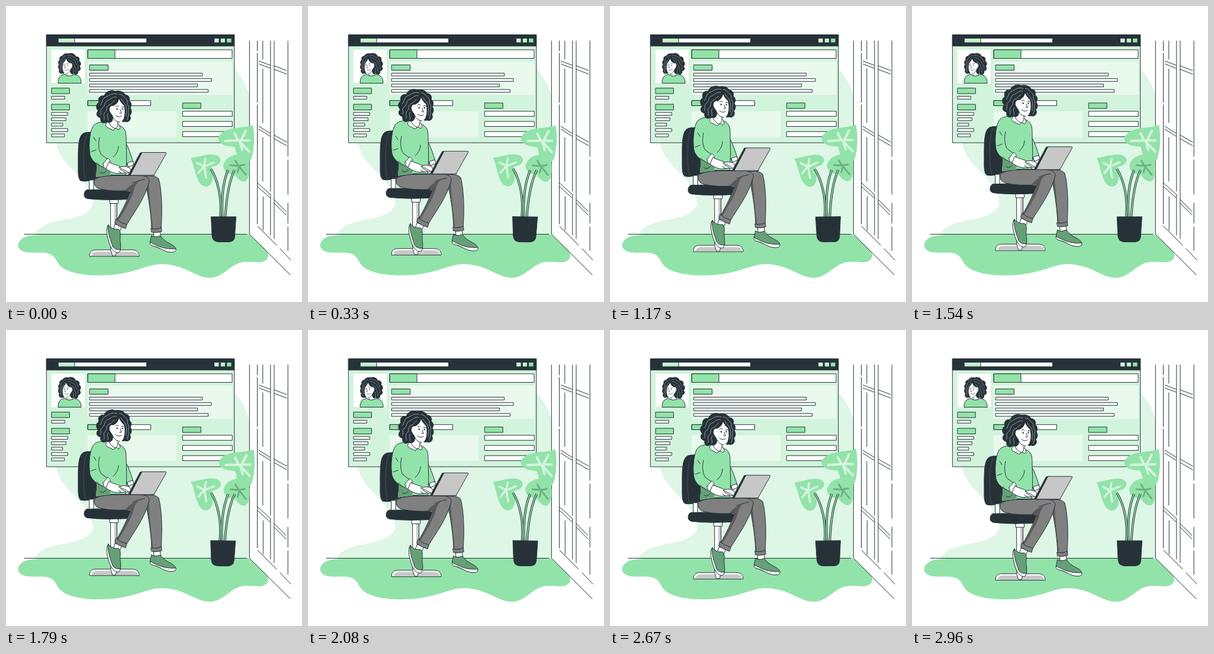
These frames come from a looping animation (500x500 px, 3 s). An HTML page:

```html
<!DOCTYPE html>
<html lang="en">
<head>
<meta charset="utf-8">
<title>Working on a profile page</title>
<style>
  html, body { margin: 0; width: 100%; height: 100%; overflow: hidden; background: #fff; }
  svg { display: block; width: 100vw; height: 100vh; }
  .ink { stroke: #263238; stroke-width: 1; stroke-linejoin: round; stroke-linecap: round; }
  .line { fill: none; }
  .dark { fill: #263238; }
  .white { fill: #fff; }
  .green { fill: #92e3a9; }
  .deep { fill: #66a077; }
  .pale { fill: #def6e5; }
  .grey { fill: #c7c7c7; }
  .pants { fill: #808080; }
  .shade { fill: #595959; }
  .vein { fill: none; stroke: #d6f4de; stroke-width: 4; stroke-linecap: round; stroke-linejoin: round; }
</style>
</head>
<body>
<svg viewBox="0 0 500 500">
  <!-- room -->
  <path class="pale" d="M85 231C88 262 122 280 137 306C143 317 151 329 145 340C133 358 102 359 80 365C62 370 52 377 49 385H411V151C406 132 397 118 386 106V231Z"/>
  <path class="green" d="M58 386H411C419 394 429 402 437 410C446 419 445 428 434 432C424 435 409 429 394 434C375 441 366 458 345 459C322 460 301 436 263 436C235 436 216 455 157 455C125 455 104 449 94 441C84 433 86 423 72 418C56 414 38 420 26 413C18 408 19 399 27 393C34 388 45 387 58 386Z"/>
  <path class="ink line" d="M31 385.500H407M411.300 59V385.500L480 454"/>
  <path class="ink line" d="M424.500 59V76M424.500 80V163M424.500 167V368M433.800 59V90M433.800 106V197M433.800 222V296M434.300 322V379M446.800 59V313M446.800 318V387M453 59V393M476.200 59V254M476.200 260V318M476.200 333V367M476.200 373V413"/>
  <path class="ink line" d="M427.500 93L446 100M427.500 98L446 105M453 101L474 109M453 107L474 115M427 203L446 215M427 208L446 220M453 218L474 230M453 224L474 236M425 299L446 318M425 305L446 324M453 327L473 347M453 333L473 353M425 372L457 404M463 410L481 429"/>

  <!-- browser page -->
  <rect class="ink" x="68.700" y="48.700" width="317" height="182.300" fill="#d3f4dc"/>
  <rect class="ink dark" x="68.700" y="48.700" width="317" height="19"/>
  <path fill="#e9f9ee" d="M138 94H382V150H138ZM138 178H288V221H138Z"/>
  <rect class="white" x="77" y="74" width="56" height="56"/>
  <g id="bars"></g>
  <use href="#head" transform="translate(224 -13) scale(-.64 .65)"/>
  <path class="ink green" d="M88 130C88 121 91 117 99 115.500Q107 121 115 115.500C124 117 127 122 127 130Z"/>

  <g id="plant">
    <path class="green" d="M367 269C370 256 384 249 400 251Q411 257 411 268C412 280 411 292 404 296C397 298 390 291 386 284C376 285 367 280 367 269Z"/>
    <path class="vein" style="stroke:#6fb083;stroke-width:3" d="M379 269L393 270L405 285M393 270L403 268M394 271L391 281M392 269L387 261"/>
    <path class="green" d="M417 201C420 216 420 240 415 256C413 264 405 266 397 260C388 254 389 245 386 238C376 237 362 236 359 226C357 214 375 208 389 206Q406 205 417 201Z"/>
    <path class="vein" d="M370 228L393 227L411 246M393 227L411 227M395 229L399 243M392 227L386 215M397 227L405 211"/>
    <path class="green" d="M312 257C326 255 339 250 350 251C361 252 366 260 360 266C356 271 349 270 346 274C349 282 352 293 345 302C338 308 330 304 326 297C319 284 318 270 312 257Z"/>
    <path class="vein" style="stroke-width:3.500" d="M323 265L335 271L351 264M334 271L325 282M335 272L338 290M335 270L337 258"/>
    <g id="stems"></g>
    <path class="ink dark" d="M346.500 356H388.500L386.500 388Q386 398.500 376 398.500H359Q349 398.500 348 388Z"/>
  </g>

  <g id="worker">
    <!-- chair -->
    <path class="ink dark" d="M132 214.500Q143 211 153 216L157 289Q140 298 127 295.500C121 293 122 279 122 266C122 243 121 218 132 214.500Z"/>
    <path class="line" stroke="#536168" stroke-width=".7" d="M138 215C129 228 130 276 134 294"/>
    <path class="ink white" d="M141 294H148V313H141Z"/>
    <path class="ink white" d="M141 422.500C141 415 145 412 152 412H213C221 412 225 416 225 422.500Z"/>
    <path class="grey" d="M145 422C145 417 149 415 154 415H213C219 415 222 418 223 422Z"/>
    <path class="ink white" d="M177 332H187.500V413L185 422H180L177 413Z"/>
    <path class="grey" d="M183 334H187V412H183Z"/>
    <path class="ink white" d="M175.500 326H189.500V333.500H175.500Z"/>
    <path class="ink dark" d="M137 310.500Q175 309 216 314L214 326Q170 329 138 325.500Q132 324 132 319Q132 312 137 310.500Z"/>

    <!-- far leg -->
    <path class="ink white" d="M249 377L250 390L262 391L259 377Z"/>
    <path class="ink deep" d="M246 388Q252 392 260 388L268 396C276 402 286 404 287 411C285 416 274 416 266 412C257 408 245 405 243.500 399Z"/>
    <path class="ink white" d="M243.500 399C255 405 268 412 287 410Q288 416 280 416C266 416 260 407 247 405Q242 403 243.500 399Z"/>
    <path class="ink pants" d="M226 288Q252 284 258 292C264 315 264 350 262 376L246 377C245 350 241 326 237 306Z"/>
    <path class="shade" d="M241 296C242 325 246 350 248 376L246 376C245 350 242 325 237 306Z"/>
    <path class="ink pants" d="M245 376Q254 378 262.500 374L263 381Q254 384 246 382Z"/>

    <!-- near leg -->
    <path class="ink white" d="M184 369L180 381L191 383L196 372Z"/>
    <path class="ink deep" d="M173 370Q178 378 190 377Q194 379 193 389C192 400 196 407 192 414C187 418 180 413 177 407C174 398 170 384 171 374Z"/>
    <path class="ink white" d="M173 370C171 383 177 396 180 406Q185 413 193 411Q193 418 186 416.500C176 412 174 398 171 388Q169 374 173 370Z"/>
    <path class="ink pants" d="M149 294C158 285 190 286 214 286C229 286 242 286 242 296C235 325 216 349 203 371L186 363C197 345 204 329 211 311.500Q180 314 159 309Q147 306 149 294Z"/>
    <path class="shade" d="M225 296Q211 300 202 311L211 312C207 329 197 345 187 362L189 363C204 340 214 321 217 307Q220 299 225 296Z"/>
    <path class="ink line" d="M214 299Q226 294 234 293"/>
    <path class="ink pants" d="M186 360Q194 367 204 369L202 376Q191 373 184 367Z"/>

    <!-- sweater -->
    <path class="ink green" d="M202 231C208 241 211 252 215 264L206 271L200 257Z"/>
    <path class="ink white" d="M205 265L214 262L216 268L207 272Z"/>
    <path class="ink green" d="M172 196C160 195 150 197 146 205C140 218 140 240 142 252C145 261 151 265 154 267Q151 283 152 290Q164 286 202 286C205 260 203 242 203 226C203 212 202 206 190 201Z"/>
    <path class="deep" d="M153 263Q163 276 176 274Q178 282 175 286Q162 286 153 289Z"/>
    <path class="ink line" d="M158 222C155 234 157 246 161 251L176 262M190 237C190 245 185 252 181 255M159 281Q163 285 169 279M148 222L152 228M144 246L152 243M154 267L165 273"/>
    <path class="ink white" d="M164 266L172 257Q177 260 176 265L169 275Q164 273 164 266Z"/>
    <path class="ink white" d="M174 264C182 268 190 269 196 273L208 279Q209 283 201 282L188 283Q178 282 169 275Z"/>
    <path class="ink white" d="M191 273Q199 269 208 273L212 278L208 282L200 277Z"/>
    <path class="ink line" d="M193 276L202 281M190 279L196 283"/>

    <!-- laptop -->
    <path class="ink dark" d="M177 285.500H251V286H177Z"/>
    <path class="ink dark" d="M227 248L231 247.500L211 285.500H207Z"/>
    <path class="ink grey" d="M230 247.500H269Q271.500 247.500 270.500 249.500L251 284Q250 286 248 286H210Z"/>

    <path class="ink white" d="M170 197C168 200 168 203 171 205L181 210L186 206L178 196Z"/>
    <path class="ink white" d="M189 199L186 206L190 209Q195 207 191 201Z"/>
    <g id="head">
      <path class="ink white" d="M176 181L174 198Q180 207 186 207Q190 203 189 192Z"/>
      <path class="ink dark" d="M166 152C167 144 179 141 184 144C193 142 200 146 201 150C207 150 210 155 208 160C213 164 212 169 210 172C214 179 211 183 209 185C213 191 207 198 201 195C196 197 193 193 194 190L180 189C181 195 176 199 171 195C165 201 158 196 160 189C153 188 151 181 156 177C151 173 152 165 157 163C154 155 160 150 166 152Z"/>
      <path class="white" d="M181 169C187 166 190 162 191 157C193 162 196 165 199 168C201 175 201 183 199 189C198 195 193 197 188 195C184 193 181 189 179 184L176 179C173 174 176 167 181 169Z"/>
      <path class="ink line" d="M179 184C181 191 186 196 192 196M185 170Q188 167 190 170M195 171Q197 169 199 171M193 175L195 181L192 181M185 185Q190 189 195 186"/>
      <path class="dark" d="M186.500 174a1.200 1.500 0 1 0 2.400 0a1.200 1.500 0 1 0-2.400 0M195.500 174a1.100 1.500 0 1 0 2.200 0a1.100 1.500 0 1 0-2.200 0"/>
      <path class="line" stroke="#c5cacc" stroke-width=".7" d="M188 149C178 146 174 152 168 154C162 157 163 164 159 168M187 154C180 152 177 158 171 160C165 163 168 170 162 173C158 176 162 182 159 185M184 160C179 161 180 166 174 167C168 170 172 177 167 180C163 184 168 190 165 193M191 149C198 149 199 155 203 157C207 161 203 165 207 169C209 174 205 178 207 182C208 187 204 189 205 193M194 156C197 162 202 164 203 170C205 177 202 181 203 187M173 181C169 186 174 190 172 194"/>
    </g>
  </g>
</svg>
<script>
  const LOOP = 3000, SWAY = 1500;
  const GREEN = "#92e3a9", WHITE = "#fff";
  const byId = id => document.getElementById(id);

  const bar = (x, y, w, h, fill = WHITE) =>
    `<rect class="ink" x="${x}" y="${y}" width="${w}" height="${h}" fill="${fill}"/>`;

  const leftList = [27, 24, 18.5, 27, 21.5];
  const textLines = [190, 205.5, 182, 200];
  byId("bars").innerHTML = [
    bar(88.5, 54.5, 149, 7.5), bar(88.5, 54.5, 27.5, 7.5, "#c4efd0"),
    ...["#d3f4dc", "#c4efd0", GREEN].map((fill, i) => bar(352 + i * 10.5, 54.5, 8, 7.5, fill)),
    bar(138.5, 74, 243.5, 14.5), bar(138.5, 74, 45.5, 14.5, GREEN),
    bar(141.5, 99.5, 31, 9, GREEN),
    ...textLines.map((w, i) => bar(141.5, 113.5 + i * 9.2, w, 4.6)),
    bar(77.3, 138.7, 30, 9.3, GREEN), bar(77.3, 152.5, 22, 4.8),
    bar(77.3, 166, 30, 9.5, GREEN),
    ...leftList.map((w, i) => bar(77.3, 179.8 + i * 9.1, w, 4.8)),
    bar(138.5, 159.8, 106, 8.5), bar(138.5, 159.8, 46, 8.5, GREEN),
    bar(298.7, 163.8, 30.5, 9.2, GREEN),
    ...[0, 1, 2].map(i => bar(298.7, 177.8 + i * 17.2, 83.5, 8.5))
  ].join("");

  const stems = ["M346 275C358 294 365 325 362 356", "M375 277C366 299 364 329 365.500 356", "M386 277C375 300 372 330 370.500 356"];
  byId("stems").innerHTML = stems.map(d =>
    `<path d="${d}" fill="none" stroke="#263238" stroke-width="3.8"/>
     <path d="${d}" fill="none" stroke="${GREEN}" stroke-width="1.8"/>`).join("");

  // Triangle wave through 0, 1, 0, -1 at each quarter.
  const triangle = u => u < .25 ? 4 * u : u < .75 ? 2 - 4 * u : 4 * u - 4;

  function draw(now) {
    const t = now % LOOP;
    const lift = 10 * (1 - Math.abs(1 - 2 * t / LOOP));
    const angle = triangle((t % SWAY) / SWAY);
    byId("worker").setAttribute("transform", `translate(0 ${-lift})`);
    byId("plant").setAttribute("transform", `rotate(${angle} 365.5 300)`);
  }

  function tick() {
    draw(performance.now());
    requestAnimationFrame(tick);
  }
  tick();
</script>
</body>
</html>
```
